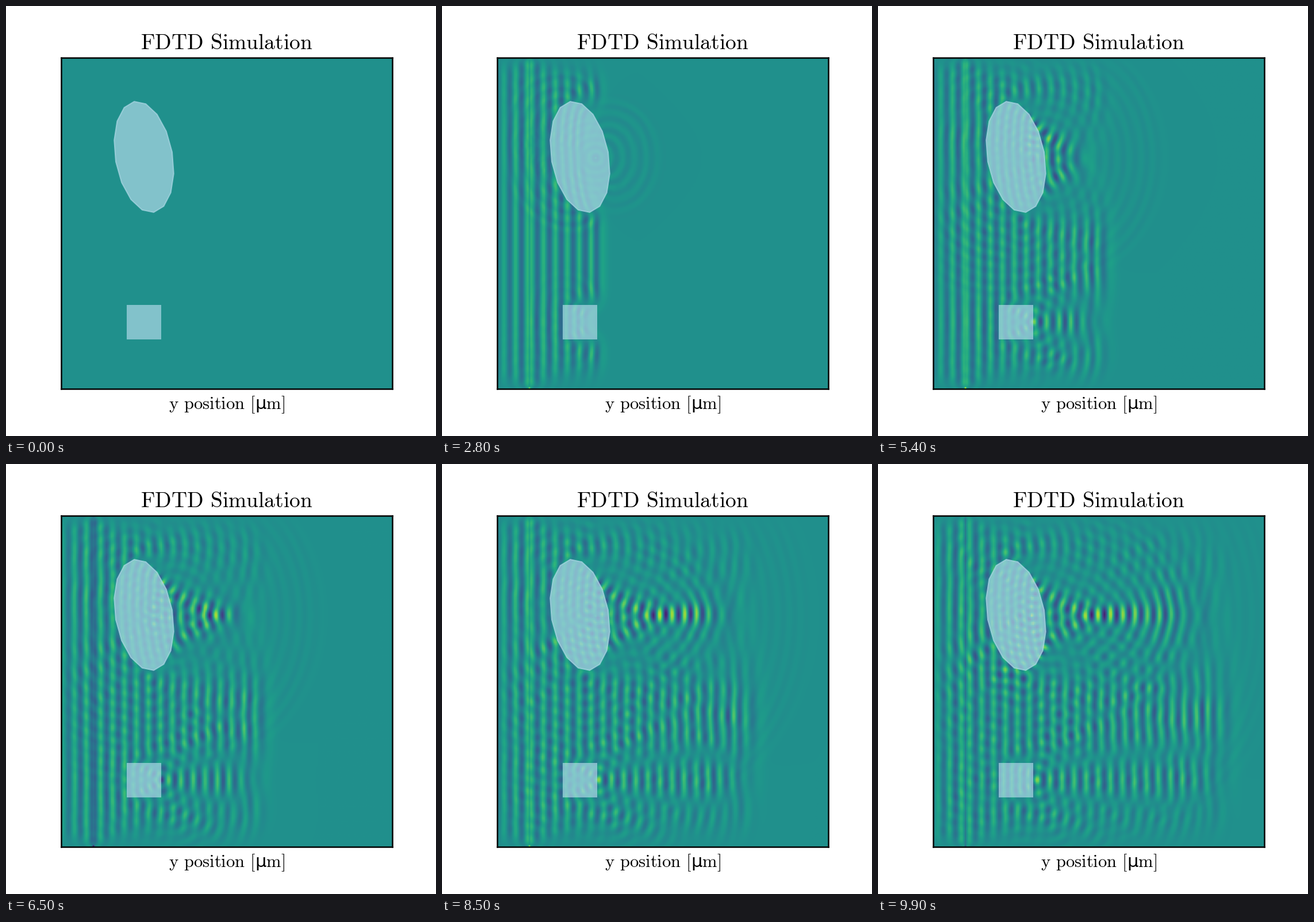
Write a matplotlib script that moves like this. It is 748 px wide and 748 px high and loops after 10000 ms.

```python
import numpy as np
import matplotlib.pyplot as plt
from matplotlib.animation import FuncAnimation
from matplotlib.patches import Polygon, Rectangle

STAGE, DPI = 748, 100
LEFT, TOP, SIDE = 95.8, 89.8, 576      # plot box in pixels, y downwards
N = 200                                # grid cells per side
FRAMES, INTERVAL = 100, 100
STEPS = 3                              # time steps per frame
COURANT = 0.5595
PERIOD = 13.16                         # source period in time steps
EPS = 2.0                              # permittivity of both objects
LINE_COL, POINT = 19, (60, 59)
LINE_AMP, POINT_AMP = 0.30, -0.36
SPONGE, SIGMA = 20, 0.07               # absorbing border

CENTER = np.array([240, 262.5])
SEMI_X, SEMI_Y, TILT = 50, 98, np.radians(10)
SQUARE = (210, 520, 60)

plt.rcParams["mathtext.fontset"] = "cm"
plt.rcParams["font.family"] = "DejaVu Sans"


def permittivity():
    px = (np.arange(N) + 0.5) * SIDE / N
    x, y = np.meshgrid(px + LEFT, px + TOP)
    dx, dy = x - CENTER[0], y - CENTER[1]
    u = dx * np.cos(TILT) - dy * np.sin(TILT)
    v = dx * np.sin(TILT) + dy * np.cos(TILT)
    sx, sy, size = SQUARE
    ellipse = (u / SEMI_X) ** 2 + (v / SEMI_Y) ** 2 <= 1
    square = (x > sx) & (x < sx + size) & (y > sy) & (y < sy + size)
    return np.where(ellipse | square, EPS, 1.0)


def damping():
    i = np.arange(N)
    depth = np.clip(SPONGE - np.minimum(i, N - 1 - i), 0, None) / SPONGE
    loss = SIGMA * depth ** 2
    return np.exp(-np.maximum(loss[:, None], loss[None, :]))


def edge_views(a):
    return a, a[::-1], a.T, a.T[::-1]


def simulate():
    """Run the 2D wave solver and return the field at every frame."""
    ez = np.zeros((N, N))
    hx, hy = np.zeros((N - 1, N)), np.zeros((N, N - 1))
    gain = COURANT / permittivity()[1:-1, 1:-1]
    damp = damping()
    mur = (COURANT - 1) / (COURANT + 1)
    fields = [ez.copy()]
    for n in range(1, STEPS * (FRAMES - 1) + 1):
        old = ez.copy()
        hx = (hx + COURANT * np.diff(ez, axis=0)) * damp[1:]
        hy = (hy + COURANT * np.diff(ez, axis=1)) * damp[:, 1:]
        div = np.diff(hx, axis=0)[:, 1:-1] + np.diff(hy, axis=1)[1:-1]
        ez[1:-1, 1:-1] += gain * div
        wave = np.sin(2 * np.pi * n / PERIOD)
        ez[1:-1, LINE_COL] += LINE_AMP * wave
        ez[POINT] += POINT_AMP * wave
        ez *= damp
        for new, prev in zip(edge_views(ez), edge_views(old)):
            new[0] = prev[1] + mur * (new[1] - prev[0])
        if n % STEPS == 0:
            shot = ez.copy()
            shot[-1, LINE_COL] = 0.9 * wave
            fields.append(shot)
    return fields


def ellipse_points(count=16):
    # vertices equally spaced in the ellipse parameter
    t = 2 * np.pi * np.arange(count) / count
    a, b = np.array([-34.4, -85.8]), np.array([38.8, -44.6])
    return CENTER + np.outer(np.cos(t), a) + np.outer(np.sin(t), b)


def label(x, y, text, size):
    fig.text(x / STAGE, 1 - y / STAGE, text, fontsize=size,
             ha="center", va="baseline")


fields = simulate()

fig = plt.figure(figsize=(STAGE / DPI, STAGE / DPI), dpi=DPI, facecolor="white")
ax = fig.add_axes([LEFT / STAGE, 1 - (TOP + SIDE) / STAGE,
                   SIDE / STAGE, SIDE / STAGE])
image = ax.imshow(fields[0], cmap="viridis", vmin=-1, vmax=1, aspect="auto",
                  extent=(LEFT, LEFT + SIDE, TOP + SIDE, TOP))
ax.set_xticks([])
ax.set_yticks([])
for spine in ax.spines.values():
    spine.set_linewidth(2.5 * 72 / DPI)

ax.add_patch(Polygon(ellipse_points(), color="lightblue", alpha=0.7,
                     lw=2 * 72 / DPI))
ax.add_patch(Rectangle(SQUARE[:2], SQUARE[2], SQUARE[2],
                       facecolor="lightblue", edgecolor="none", alpha=0.7))

SPACE = r"\hspace{0.38}"
label(383.8, 75, rf"$\mathrm{{FDTD{SPACE}Simulation}}$", 27)
label(384, 701.5, rf"$\mathrm{{y{SPACE}position{SPACE}[}}$µ$\mathrm{{m]}}$", 22)


def update(k):
    image.set_data(fields[k])
    return (image,)


anim = FuncAnimation(fig, update, frames=FRAMES, interval=INTERVAL,
                     repeat=True, repeat_delay=0)
plt.show()
```
